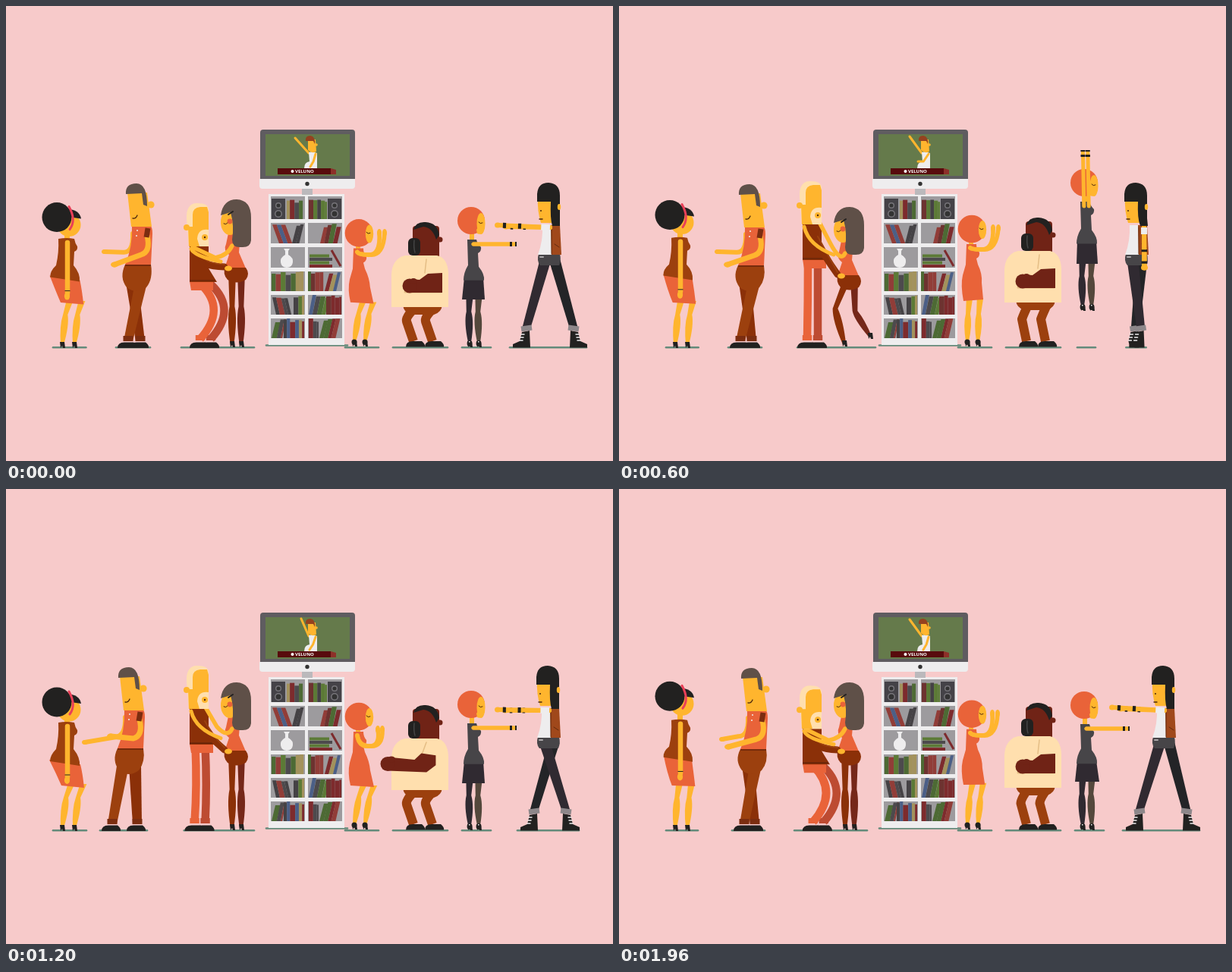
An HTML page with a canvas for the animation above (2 s loop, 800 by 600 pixels).

```html
<!DOCTYPE html>
<html lang="en">
<head>
<meta charset="utf-8">
<title>Dance party</title>
<style>
  html, body { margin: 0; width: 100%; height: 100%; overflow: hidden; background: #f7caca; }
  canvas { display: block; }
</style>
</head>
<body>
<canvas id="stage" width="800" height="600"></canvas>
<script>
const g = document.getElementById('stage').getContext('2d');
const SKIN = '#ffb52e', ORANGE = '#e96339', RUST = '#9c400e', BROWN = '#8b3008', MAROON = '#752719',
  BLACK = '#222120', HAIR = '#5f5048', CREAM = '#ffdfae', CHAR = '#474548', NIGHT = '#302a31',
  SHADE = '#648b7b', WHITE = '#eeedee';

// Poses repeat every beat of 1000 ms; each row holds one value per key phase.
const KEYS = [0, .2, .24, .52, .6, .92, .96], N = KEYS.length;
let phase = 0, time = 0;

// Cyclic monotone cubic through the key values.
function at(...v) {
  const X = j => KEYS[(j + N) % N] + Math.floor(j / N), Y = j => v[(j + N) % N];
  const slope = j => (Y(j + 1) - Y(j)) / (X(j + 1) - X(j));
  const tangent = j => {
    const a = slope(j - 1), b = slope(j);
    return a * b > 0 ? 2 * a * b / (a + b) : 0;
  };
  let i = N - 1;
  while (phase < KEYS[i]) i--;
  const h = X(i + 1) - X(i), s = (phase - X(i)) / h, r = 1 - s;
  return Y(i) * (1 + 2 * s) * r * r + tangent(i) * h * s * r * r +
    Y(i + 1) * s * s * (3 - 2 * s) - tangent(i + 1) * h * s * s * r;
}
const mix = (a, b, u) => a + (b - a) * u;

function fill(c, d) { g.fillStyle = c; g.fill(new Path2D(d)); }
function line(c, w, d, cap = 'round') {
  g.strokeStyle = c; g.lineWidth = w; g.lineCap = cap; g.lineJoin = 'round';
  g.stroke(new Path2D(d));
}
function dot(c, x, y, rx, ry = rx) {
  g.fillStyle = c; g.beginPath(); g.ellipse(x, y, rx, ry, 0, 0, 7); g.fill();
}
function box(c, x, y, w, h, r = 0) {
  g.fillStyle = c; g.beginPath(); g.roundRect(x, y, w, h, r); g.fill();
}
const shadow = (a, b) => line(SHADE, 2.6, `M${a + 1} 450.3H${b - 1}`);

// Tapered leg with a calf; w is half the thigh width.
function leg(c, w, hx, hy, kx, ky, fx, fy) {
  const m = mix(ky, fy, .35), mx = mix(kx, fx, .3), o = 1.5 * w;
  fill(c, `M${hx - w} ${hy}L${kx - .7 * w} ${ky}Q${mx - o} ${m} ${fx - .45 * w} ${fy}H${fx + .45 * w}
    Q${mx + o} ${m} ${kx + .7 * w} ${ky}L${hx + w} ${hy}Z`);
}
const heel = (x, y) => fill(BLACK, `M${x - 3} ${y - 5}H${x + 3}L${x + 4} ${y + 3}H${x + 1}L${x} ${y}L${x - 2} ${y + 3}Z`);
const shoe = (x, y = 447.5) => fill(BLACK, `M${x - 14} ${y + 3.5}Q${x - 14} ${y - 4} ${x - 5} ${y - 4}H${x + 7}Q${x + 12} ${y} ${x + 11} ${y + 3.5}Z`);

function tv() {
  box('#5f5c60', 335, 163, 125, 70, 4);
  box('#657a4b', 342, 169, 111, 55);
  fill(WHITE, 'M334 228H460V237Q460 241 456 241H338Q334 241 334 237Z');
  dot('#333', 397, 234.5, 2.7);
  box('#bbb9bc', 390, 241, 14, 8);
  // keyboard player
  const hx = at(381, 389, 390, 381, 383, 381, 383), hy = at(174, 171, 170, 174, 172, 174, 172);
  line(SKIN, 3, `M399 194L${hx} ${hy}`);
  fill(WHITE, 'M399 193Q404 191 410 194V214H393Q393 206 400 205Z');
  fill(SKIN, 'M398 176H408L409 192Q403 195 398 190Z');
  dot(SKIN, 409, 183, 1.8);
  fill('#95421f', 'M395 178Q394 171 401 171Q408 172 407 182L405 178Z');
  const ex = at(401, 400, 402, 417, 394, 401, 401), ey = at(212, 212, 212, 213, 205, 212, 212);
  line(SKIN, 3, `M408 195L${mix(408, ex, .55) + 1} 205L${ex} ${ey}`);
  box('#580b0d', 358, 214, 70, 8);
  fill('#8d3029', 'M428 214L435 216V222H428Z');
  dot('#fff', 377.5, 218, 2);
  g.fillStyle = '#fff'; g.font = 'bold 6px "Open Sans", Arial, sans-serif';
  g.fillText('VELUNO', 381, 220.2);
}

let seed;
const rnd = () => (seed = seed * 16807 % 2147483647) / 2147483647;
const SPINES = ['#7d2b2d', '#4d4a4d', '#5c7a36', '#913d38', '#4b5f87', '#7d2b2d', '#a3925c', '#454245', '#6d3330', '#4d6a34'];
function books(a, b, y, lean = 0) {
  for (let x = a; x < b - 2;) {
    const w = Math.min(4 + rnd() * 3, b - x), h = 21 + rnd() * 5;
    fill(SPINES[Math.floor(rnd() * SPINES.length)], `M${x} ${y}h${w}l${lean} ${-h}h${-w}Z`);
    x += w;
  }
}
function speaker(x) {
  box('#444247', x, 254, 18, 27);
  dot('#77757a', x + 9, 263, 4); dot('#333', x + 9, 263, 2.6);
  dot('#77757a', x + 9, 274, 5); dot('#333', x + 9, 274, 3.5);
}
function shelf() {
  seed = 4711;
  line(SHADE, 2.6, 'M343 447.5H450');
  box(WHITE, 346, 248, 100, 199);
  const floors = [281, 313, 345, 376, 407, 438];
  floors.forEach((y, i) => {
    const top = i ? floors[i - 1] + 5 : 251;
    box('#9d9b9e', 349, top, 45, y - top);
    box('#9d9b9e', 398, top, 45, y - top);
  });
  speaker(350); books(370, 393, 281);
  books(399, 423, 281); speaker(424);
  books(360, 379, 313, -9); books(377, 388, 313, 6);
  books(414, 437, 313, 5);
  fill(WHITE, 'M366 320H374L372 323V328Q379 332 378 338Q377 345 370 345Q363 345 362 338Q361 332 368 328V323Z');
  ['#7d2b2d', '#5c7a36', '#4d4a4d', '#5c7a36'].forEach((c, i) => box(c, 400, 341 - i * 4.5, 30 - i % 2 * 4, 4));
  line('#7d2b2d', 3, 'M429 322L441 343', 'butt');
  books(350, 393, 376); books(398, 419, 376); books(420, 436, 376, 6);
  books(356, 378, 407, -5); books(379, 393, 407); books(399, 421, 407, 5); books(422, 442, 407);
  books(350, 364, 438, 5); books(366, 393, 438); books(399, 412, 438); books(413, 436, 438, 6);
}

function bunWoman() {
  const u = at(.8, 1, 1, .95, .55, 0, .35), y = 269 + 12 * u, s = mix(303, 308, u), h = mix(352, 360, u);
  shadow(61, mix(104, 107, u));
  for (const d of [0, 16]) {
    leg(SKIN, 4.4, mix(76, 86, u) + d, 389, mix(75, 79, u) + d, 407, 74 + d, 447);
    heel(74 + d, 448);
  }
  fill(ORANGE, `M${60 - 3 * u} ${h - 3}L${mix(95, 98, u)} ${h + 3}Q${mix(97, 101, u)} 375 ${mix(99, 103, u)} ${mix(391, 394, u)}
    L${mix(68, 73, u)} 391Q${mix(62, 66, u)} 375 ${60 - 3 * u} ${h - 3}Z`);
  box(SKIN, 77, s - 8, 7, 12);
  fill(RUST, `M69 ${s}Q80 ${s - 2} 90 ${s}Q91 ${s + 6} 94 ${s + 10}Q95 ${s + 15} 90 ${s + 17}L89 ${s + 35}Q98 ${h - 6} 97 ${h + 5}
    L${59 - u} ${h - 1}Q58 ${h - 9} 66 ${s + 35}Q70 ${s + 18} 69 ${s}Z`);
  line(SKIN, 6.5, `M81 ${s + 5}L81 ${mix(372, 380, u)}`);
  dot(SKIN, 80.5, mix(377, 384, u), 3.6, 5);
  line(BLACK, 1, `M77.5 ${mix(370, 377, u)}h7`, 'butt');
  dot(SKIN, 83, y + 10, 15.5);
  fill(BLACK, `M80 ${y - 11}Q97 ${y - 10} 99 ${y + 2}L85 ${y}Z`);
  dot(BLACK, 67, y, 19.5);
  line('#e94058', 3, `M83 ${y - 14}Q93 ${y + 4} 84 ${y + 16}`);
}

function stepMan() {
  const x = at(172, 162, 161, 166, 172, 177, 175), dy = at(0, 1, 0, 3, 1, 4, 2);
  const fa = at(161, 140, 138, 157, 160, 171, 165), fb = at(177, 173, 174, 163, 175, 175, 179);
  const s = at(6, -8, -8, 2, 6, 3, 5);
  shadow(Math.min(fa, fb) - 17, Math.max(fa, fb) + 14);
  for (const [c, hx, fx] of [[BROWN, x - s, fb], [RUST, x + s, fa]]) {
    fill(c, `M${hx - 8} 365H${hx + 8}L${fx + 6} 442H${fx - 6}Z`);
    box('#7b2d10', fx - 6.5, 435, 13, 7);
    shoe(fx);
  }
  fill(RUST, `M${x - 15} ${341 + dy}H${x + 19}Q${x + 22} 360 ${x + 13} 371Q${x} 381 ${x - 13} 371Q${x - 23} 358 ${x - 15} ${341 + dy}Z`);
  const hx = at(130, 104, 101, 108, 130, 139, 136), hy = at(324, 334, 335, 328, 324, 336, 330);
  line(SKIN, 6, `M${x - 5} ${300 + dy}Q${x - 4} 326 ${x - 18} ${mix(325, hy, .25)}L${hx} ${hy}`);
  dot(SKIN, hx, hy, 4, 3);
  fill(ORANGE, `M${x - 6} ${290 + dy}H${x + 18}Q${x + 21} ${291 + dy} ${x + 21} ${300 + dy}L${x + 19} ${341 + dy}H${x - 15}Q${x - 5} ${318 + dy} ${x - 6} ${290 + dy}Z`);
  line('#6b250b', 1.6, `M${x - 15} ${342 + dy}H${x + 19}`, 'butt');
  const ex = at(143, 138, 137, 150, 143, 140, 144), ey = at(341, 326, 325, 338, 341, 338, 340);
  line(SKIN, 7, `M${x + 14} ${303 + dy}Q${x + 19} ${324 + dy} ${x + 6} ${328 + dy}L${ex} ${ey}`);
  dot(SKIN, ex, ey, 5, 3.5);
  line('#7b2d10', 7, `M${x + 15} ${293 + dy}L${x + 13} ${305 + dy}`, 'butt');
  dot(WHITE, x + 1, 296 + dy, 1); dot(WHITE, x, 303 + dy, 1);
  fill(SKIN, `M${x - 12} ${246 + dy}H${x + 14}L${x + 20} ${291 + dy}H${x - 7}Z`);
  dot(SKIN, x + 19, 262 + dy, 4.6);
  fill(HAIR, `M${x - 14} ${248 + dy}Q${x - 15} ${234 + dy} ${x} ${234 + dy}Q${x + 14} ${234 + dy} ${x + 14} ${264 + dy}L${x + 9} ${262 + dy}L${x + 7} ${247 + dy}Z`);
  line('#4a260d', 1.3, `M${x - 5} ${280 + dy}q4 1 6 -4`);
}

function couple() {
  const u = at(1, .07, 0, 0, 0, .8, .97), y = 29 * u;
  const d = at(0, 0, 0, 13, 10, 0, 0), k = at(0, 0, 0, 1, 1, 0, 0);
  const first = time >= 240 && time < 1240;
  shadow(mix(234, 230, u), 328 + 11 * k);
  // his legs
  for (const [c, hx, kx, fx] of [['#bd4b32', 262, 305, 262], [ORANGE, 249, 291, 248]]) {
    line(c, 10.5, `M${hx + 8 * u} ${338 + y}Q${mix(hx, kx, u)} ${390 + 10 * u} ${fx + 8 * u} 439`, 'butt');
    box(c, fx + 8 * u - 6.2, 434, 12.4, 7);
    shoe(fx + 7 * u + 1);
  }
  // her legs
  const A = first ? [285, 399, 297, 446] : [284, 398, 322, 429];
  const B = first ? [311, 402, 331, 436] : [297, 402, 309, 446];
  for (const [c, hx, p] of [[MAROON, 310, B], [BROWN, 298, A]]) {
    const fx = mix(hx, p[2], k), fy = mix(447, p[3], k);
    leg(c, 4.8, hx, 357 + d, mix(hx, p[0], k), mix(396, p[1], k), fx, fy);
    heel(fx, fy);
  }
  // his torso
  fill(ORANGE, `M242 ${334 + y}H273V${346 + y}H244Z`);
  fill(BROWN, `M242 ${288 + y}H267V${317 + y}L278 ${335 + y}H242Z`);
  line('#5b2009', 1.2, `M242 ${333 + y}H276`, 'butt');
  // her body
  fill(ORANGE, `M293 ${300 + d}H309L307 ${325 + d}L316 ${346 + d}H288L294 ${328 + d}Q286 ${322 + d} 290 ${314 + d}Z`);
  fill(BROWN, `M289 ${345 + d}H316Q322 ${353 + d} 316 ${361 + d}Q304 ${368 + d} 292 ${361 + d}Q285 ${353 + d} 289 ${345 + d}Z`);
  // his arm
  const gy = 346 + d;
  line(BROWN, 9, `M257 ${304 + y}Q${mix(268, 258, u)} ${mix(326, 343, u)} 288 ${gy - 2}`);
  line(RUST, 2, `M262 ${304 + y}Q${mix(273, 266, u)} ${mix(324, 339, u)} 288 ${gy - 5}`);
  dot(SKIN, 293, gy, 5, 3.5);
  // her arms
  line(SKIN, 5.5, `M298 ${316 + d}Q292 ${329 + d} ${mix(278, 276, u)} ${mix(312, 332, u)}L${mix(265, 246, u)} ${mix(287, 318, u)}`);
  line(SKIN, 5, `M244 ${291 + y}Q${mix(250, 248, u)} ${mix(316, 330, u)} 283 ${mix(328, 337, u)}`);
  // his head
  fill(CREAM, `M238 ${252 + y}Q237 ${231 + y} 252 ${231 + y}Q267 ${231 + y} 267 ${240 + y}V${288 + y}H241Z`);
  fill(SKIN, `M246 ${246 + y}Q246 ${237 + y} 256 ${236 + y}H265L267 ${243 + y}V${266 + y}Q253 ${264 + y} 252 ${278 + y}L255 ${288 + y}H241L240 ${262 + y}H246Z`);
  dot(SKIN, 238, 263 + y, 4);
  dot(SKIN, 262, 276 + y, 4); dot('#4a260d', 262, 276 + y, 1.2);
  // her head
  dot(SKIN, 295, 285 + d, 12, 17);
  fill(HAIR, `M283 ${276 + d}Q286 ${255 + d} 304 ${255 + d}Q323 ${256 + d} 323 ${279 + d}V${309 + d}Q322 ${319 + d} 310 ${318 + d}Q298 ${319 + d} 298 ${308 + d}Q301 ${290 + d} 296 ${272 + d}Z`);
  line(BLACK, 2, `M293 ${275 + d}L299 ${271 + d}`);
  dot(ORANGE, 295, 284 + d, 3.4);
  line('#4a260d', 1, `M287 ${287 + d}q3 2 5 -1`);
}

function clapWoman() {
  const u = at(.9, 1, 1, 1, 0, 0, .45), y = 6 * u;
  line(SHADE, 2.6, 'M447 450.3H491');
  for (const d of [0, 14]) {
    leg(SKIN, 4.2, mix(462, 471, u) + d, 385 + y, mix(460, 465, u) + d, 406, 459 + d, 443);
    heel(459 + d, 446); dot(BLACK, 459 + d, 443, 3.5);
  }
  box(SKIN, 461, 311 + y, 6, 9);
  fill(ORANGE, `M458 ${314 + y}H471Q471 ${321 + y} 475 ${325 + y}Q476 ${330 + y} 471 ${333 + y}L473 ${341 + y}Q479 ${353 + y} ${478 + 2 * u} ${365 + y}
    L${480 + 5 * u} ${387 + y}L454 ${389 + 2 * u}Q450 ${368 + y} 453 ${355 + y}L457 ${341 + y}Z`);
  const hx = at(492, 490, 488, 490, 493, 493, 492), hy = at(299, 317, 327, 317, 293, 293, 296);
  const ey = at(330, 341, 352, 341, 323, 323, 327), w = at(7, 6, 5, 6, 7, 7, 7);
  for (const o of [w, 0]) {
    line(SKIN, 5.6, `M463 ${319 + y}Q465 ${ey - 2} ${476 + o / 2} ${ey - 2}Q${494 + o / 2} ${ey} ${hx + o} ${hy}`);
    dot(SKIN, hx + o, hy, 3, 5);
  }
  dot(ORANGE, 465, 294 + y, 18.3);
  dot(SKIN, 479, 295 + y, 5.2, 12);
  line('#4a260d', 1, `M480 ${294 + y}q-3 2 -5 -1`);
}

function bigMan() {
  const y = at(0, 0, 0, 0, -6, -6, -3), b = 1 + y / 6;
  const hx = at(532, 503, 488, 506, 532, 532, 532), e = (532 - hx) / 44, hy = 369 + y - 10 * e;
  shadow(509, 583);
  for (const d of [0, 25]) {
    line(RUST, 12, `M${541 + d} ${396 + y}Q${mix(533, 526, b) + d} ${410 + y / 2} ${mix(531, 528, b) + d} ${416 + y / 2}L${537 + d} 442`, 'butt');
    shoe(d + 541, 446);
  }
  fill(RUST, `M523 ${394 + y}H575Q574 ${404 + y} 564 ${407 + y}H534Q524 ${404 + y} 523 ${394 + y}Z`);
  box('#702316', 536, 290 + y, 35, 45, 4);
  dot('#702316', 572, 308 + y, 3.5);
  fill(BLACK, `M537 ${295 + y}Q540 ${284 + y} 553 ${285 + y}Q569 ${286 + y} 571 ${302 + y}L567 ${308 + y}Q562 ${292 + y} 550 ${291 + y}Z`);
  box(BLACK, 530, 306 + y, 16, 23, 6);
  line('#444', 1.5, `M538 ${309 + y}Q537 ${318 + y} 539 ${325 + y}`);
  fill(CREAM, `M508 ${397 + y}V${354 + y}Q509 ${333 + y} 526 ${329 + y}H568Q582 ${332 + y} 583 ${352 + y}V${397 + y}Z`);
  line('#e4bd85', 1.5, `M554 ${334 + y}L${mix(552, 545, e)} ${352 + y}`);
  if (e < .5) line('#e4bd85', 3, `M526 ${377 + y}H573`);
  const sx = mix(566, 553, e);
  fill('#702316', `M${sx - 10} ${mix(353, 346, e) + y}L${sx + 9} ${mix(352, 351, e) + y}V${378 + y - 21 * e}L${mix(570, 546, e)} ${378 + y - 7 * e}
    L${hx} ${hy + 9}V${hy - 9}L${mix(545, 535, e)} ${mix(361, 355, e) + y}Z`);
  dot('#702316', hx, hy, 9.5);
  dot('#702316', hx + 5, hy - 6, 5, 4);
}

function jumpWoman() {
  const top = at(265, 266, 268, 218, 215, 275, 267), hem = at(387, 388, 390, 345, 340, 384, 386);
  const foot = at(447, 447, 447, 403, 399, 447, 447), swing = at(0, 0, 0, 0, 0, 11, 2);
  const s = top + 43, air = (447 - foot) / 48, waist = mix(s, hem, .53);
  shadow(600 + 3 * air, 640 - 11 * air);
  for (const [c, x] of [[NIGHT, 611], ['#54483c', 623]]) {
    leg(c, 4.6, x, hem - 4, x - 1, hem + 16, x, foot - 4);
    heel(x, foot); dot(BLACK, x, foot - 2, 3.4, 4);
    box(WHITE, x - 1, foot - 5, 1.5, 1.5);
  }
  fill(NIGHT, `M604 ${waist + 8}H629L${631 + swing} ${hem}L${mix(601, 603, air)} ${hem}Z`);
  box(SKIN, 611, s - 8, 6, 12);
  fill(CHAR, `M608 ${s}H620Q621 ${s + 5} 626 ${s + 10}Q627 ${s + 15} 622 ${s + 18}L623 ${waist - 6}Q631 ${waist + 4} 630 ${waist + 12}H603Q603 ${waist + 2} 609 ${waist - 8}Z`);
  dot(ORANGE, 613, top + 18, 18);
  dot(SKIN, 626, top + 22, 5.5, 14);
  fill(SKIN, `M620 ${top + 30}L631 ${top + 14}V${top + 28}Q627 ${top + 38} 621 ${top + 35}Z`);
  line('#4a260d', 1, `M628 ${top + 21}q-3 2 -5 -1`);
  const a = at(0, 0, -.12, 1.5, 1.59, -.1, 0), len = at(57, 57, 49, 67, 74, 50, 57);
  const c = Math.cos(a), n = Math.sin(a);
  for (const o of [-3.2 * n, 3.2 * n]) {
    const p = r => `${616 + c * r + o} ${s + 6 - n * r}`;
    line(SKIN, 5, `M${p(0)}L${p(len - 3)}`);
    line(BLACK, 6, `M${p(len - 9)}L${p(len - 6)}M${p(len - 2)}L${p(len)}`, 'butt');
  }
}

function rocker() {
  const x = at(715, 714, 714, 692, 681, 708, 717), mid = at(717, 717, 717, 695, 684, 708, 717);
  const wide = time < 600 || time >= 1600, sep = at(1, 1, 1, .18, .17, .74, 1) * (wide ? 62 : -42);
  const half = Math.abs(sep) / 2, toe = 5 + 13 * Math.min(1, half / 15);
  shadow(mid - half - 5 - toe, mid + half + toe);
  for (const [c, hx, fx] of [['#232427', x + 8, mid + sep / 2], [NIGHT, x - 4, mid - sep / 2]]) {
    fill(c, `M${hx - 7.5} 335H${hx + 7.5}L${fx + 5.5} 424H${fx - 5.5}Z`);
    const t = half > 8 && fx > mid ? 1 : -1;
    fill(BLACK, `M${fx - t * 4} 428L${fx + t * 6} 430L${fx + t * 9} 442L${fx + t * toe} 446V450.5H${fx - t * 5}Z`);
    line(WHITE, 1.5, `M${fx + t * 3} 433h${t * 4}M${fx + t * 4} 437h${t * 4}M${fx + t * 5} 441h${t * 4}`);
    line('#8d878a', 7, `M${fx - 7} ${425 - t}L${fx + 7} ${425 + t}`, 'butt');
  }
  fill(CHAR, `M${x - 13} 327H${x + 15}Q${x + 17} 335 ${x + 14} 342H${x - 11}Q${x - 16} 336 ${x - 13} 327Z`);
  fill(WHITE, `M${x - 8} 289H${x + 6}V328H${x - 14}Q${x - 7} 310 ${x - 8} 289Z`);
  fill('#a0481b', `M${x + 3} 289H${x + 15}L${x + 17} 328H${x + 4}Z`);
  line('#62290d', 1, `M${x + 4} 292V327M${x + 8} 314l6 4`);
  line('#aaa7a9', 2, `M${x - 11} 331h4`);
  const sx = x + at(2, 2, 2, 5, 11, 2, 2);
  const arm = (hx, hy) => {
    const p = r => `${mix(sx, hx, r)} ${mix(292, hy, r)}`;
    line(SKIN, 6, `M${p(0)}L${p(1)}`);
    line(WHITE, 8, `M${p(0)}L${p(.17)}`, 'butt');
    line(BLACK, 7, `M${p(.55)}L${p(.61)}M${p(.84)}L${p(.9)}`, 'butt');
    dot(SKIN, hx, hy, 4, 3.6);
  };
  arm(x + at(-56, -56, -56, -19, 12, -45, -56), at(291, 292, 292, 344, 345, 322, 290));
  arm(x + at(-67, -66, -67, -36, 11, -63, -67), at(289, 291, 291, 342, 345, 311, 288));
  const flick = at(0, 0, 0, 9, 1, 0, 0);
  fill(SKIN, `M${x - 14} 253H${x + 5}V286H${x - 10}Q${x - 15} 270 ${x - 14} 253Z`);
  fill(BLACK, `M${x - 15} 258V248Q${x - 14} 233 ${x} 233Q${x + 15} 234 ${x + 15} 250V280L${x + 15 + flick} 290H${x + 5 + flick}Q${x + 2} 280 ${x + 3} 258Z`);
  dot(SKIN, x + 14, 265, 2.2, 4);
  line('#4a260d', 1.4, `M${x - 12} 281h4`);
  dot('#4a260d', x - 10, 270, 1);
}

const start = performance.now();
function frame(now) {
  time = Math.floor(Math.max(0, now - start) / 40) * 40 % 2000;
  phase = time % 1000 / 1000;
  g.fillStyle = '#f7caca';
  g.fillRect(0, 0, 800, 600);
  for (const draw of [shelf, tv, bunWoman, stepMan, couple, clapWoman, bigMan, jumpWoman, rocker]) draw();
  requestAnimationFrame(frame);
}
requestAnimationFrame(frame);
</script>
</body>
</html>
```
